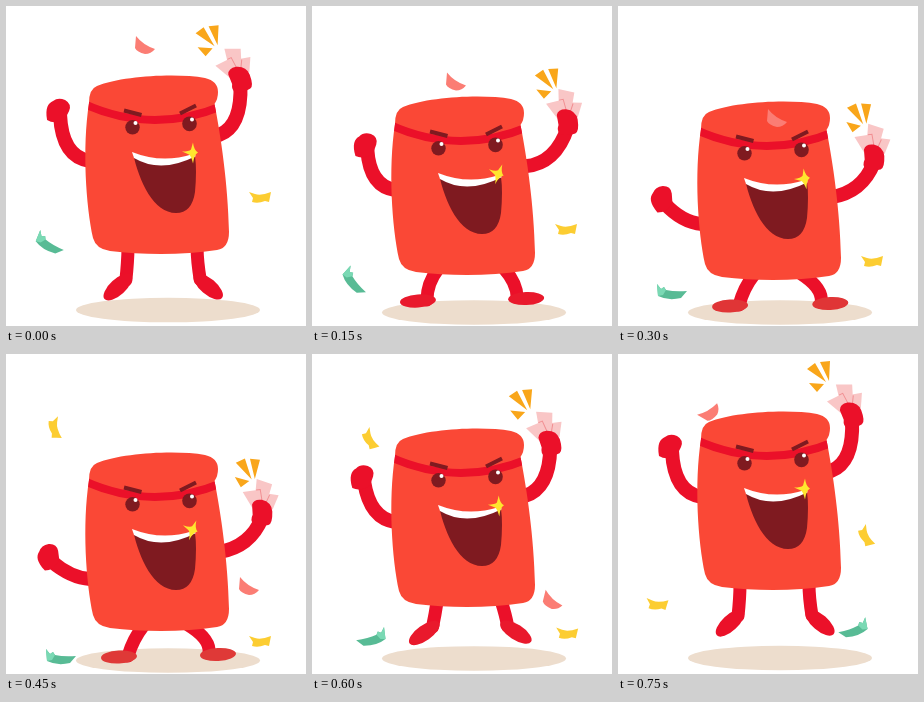
An HTML page for the animation above (900 ms loop, 300 by 320 pixels).

```html
<!DOCTYPE html>
<html lang="en">
<head>
<meta charset="utf-8">
<title>Jumping red envelope</title>
<style>
html, body { margin: 0; width: 100%; height: 100%; overflow: hidden; background: #fff; }
svg { display: block; width: 300px; height: 320px; }
</style>
</head>
<body>
<svg id="stage" viewBox="0 0 300 320"></svg>
<script>
const RED = '#eb1029', BODY = '#fa4836', DARK = '#7f1a20';
const STEP = 150;
const DIPS = [0, 21, 26, 29, 5, -12];    // how far the body sinks in each pose
const SWINGS = [0, .2, .9, 1, .2, 0];    // how far the arms have dropped

const smooth = (a, b, v) => {
  const p = Math.min(1, Math.max(0, (v - a) / (b - a)));
  return p * p * (3 - 2 * p);
};
const mix = (a, b, p) => a + (b - a) * p;

const shape = (d, fill) => `<path d="${d}" fill="${fill}"/>`;
const line = (d, color, width, cap = 'butt') =>
  `<path d="${d}" fill="none" stroke="${color}" stroke-width="${width}" stroke-linecap="${cap}"/>`;
const dot = (x, y, rx, ry, fill) => `<ellipse cx="${x}" cy="${y}" rx="${rx}" ry="${ry}" fill="${fill}"/>`;
const place = (x, y, turn, content, flip = 1) =>
  `<g transform="translate(${x} ${y}) rotate(${turn}) scale(${flip} 1)">${content}</g>`;
const limb = (start, bend, end, width) => line(`M${start}Q${bend} ${end}`, RED, width, 'round');

const bodyPath = 'M83 97Q83 83 91 80C116 70 170 67 199 72Q212 75 212 86Q212 93 208.5 98' +
  'C215 131 222 178 223 226Q223 242 211 244C178 249 138 249 104 245Q90 243 87 232C80 200 76 142 83 97Z';
const envelope = `<clipPath id="body"><path d="${bodyPath}"/></clipPath>` +
  shape(bodyPath, BODY) +
  `<g clip-path="url(#body)">${line('M78 98Q146 129 216 100', RED, 8)}</g>` +
  line('M118 104.5L135.5 109M174 107.5L190 99.5', DARK, 4) +
  dot(126.5, 121.3, 7.2, 7.3, DARK) + dot(129.5, 117, 2, 2.1, '#fff') +
  dot(183.5, 117.8, 7.3, 7.4, DARK) + dot(186, 113.5, 2, 2.1, '#fff') +
  shape('M127 147Q155 158 189 150Q191 164 189 186Q186 207 170 207C148 207 133 176 127 147Z', DARK) +
  shape('M126 146Q156 158 187 148L190 150Q155 168 128 152Z', '#fff');

const star = shape('M1-10Q2-2 6 0Q2 2 1 11Q-1 3-3 2L-10-1Q-3-1-1-3Z', '#ffe62e');
const fist = shape('M-11 9C-13-3-10-8-5-10Q0-14 7-11Q14-7 11 0L7 8Q-3 14-11 9Z', RED);
const cardFist =
  shape('M-10-33L6-30L3-9L-9-12Z', '#f9c6c6') +
  shape('M-22-18L-8-22L0-6L-9-2Z', '#f9c6c6') +
  shape('M4-20L14-20L10-5L1-8Z', '#f9c6c6') +
  line('M-9-22L-5-23L-1-10M5-19L2-9', '#f18f92', 1) +
  shape('M-11-7Q-10-13-2-13Q8-12 10-3Q12 9 8 11Q0 14-7 12Q-11 9-9 3Z', RED);
const rays = shape('M-9-23L1-24L0-4ZM-22-16L-14-22L-3-3ZM-20-2L-5-1L-12 7Z', '#f9a61a');

const pink = shape('M-9-10Q-2-1 10 3Q6 8 0 8Q-8 6-10 2Z', '#fb7d74');
const yellow = shape('M-11-5L-5-3Q1-1 11-5L10 0L9 5L5 4Q-2 7-8 5L-7 1Z', '#fccd32');
const green = shape('M-15-8L-11-3L-8-5L-6-2Q3 0 15-1L9 6Q-4 9-14 4Z', '#58bb95') +
  shape('M-15-8L-11-3L-8-5L-6-2L-9 3L-14 4Z', '#7ad9b4');

// Each scrap drifts from [x, y, turn] to another between its first and last pose.
const scraps = [
  { art: pink, first: 0, last: 2, from: [139, 40, 0], to: [159, 113, 0] },
  { art: pink, first: 3, last: 4, from: [243, 233, 0], to: [241, 247, 9] },
  { art: pink, first: 5, from: [92, 57, -64] },
  { art: yellow, first: 0, last: 3, from: [254, 191, 0], to: [254, 287, 0] },
  { art: yellow, first: 3, last: 4, from: [49, 74, 80], to: [58, 85, 63] },
  { art: yellow, first: 4, from: [255, 279, 2] },
  { art: yellow, first: 5, from: [248, 182, 65] },
  { art: yellow, first: 5, from: [39, 250, 6] },
  { art: green, first: 0, last: 1, from: [44, 238, 27], to: [43, 276, 47] },
  { art: green, first: 2, last: 3, from: [54, 286, 0], to: [55, 303, 0] },
  { art: green, first: 4, from: [59, 284, -12], flip: -1 },
  { art: green, first: 5, from: [235, 275, -16], flip: -1 }
];

function drawScrap({ art, first, last = first, from, to = from, flip }, pose) {
  if (pose < first || pose > last) return '';
  const p = (pose - first) / (last - first || 1);
  return place(mix(from[0], to[0], p * p), mix(from[1], to[1], p), mix(from[2], to[2], p), art, flip);
}

function drawLegs(dip, swing, ground) {
  const color = `rgb(${235 - 12 * swing} ${17 + 40 * swing} ${41 + 14 * swing})`;
  const footY = 281 + dip - 7 * smooth(0, 5, dip);
  const hipY = 242 + dip, kneeY = 256 + dip;
  const leg = (hipX, kneeX, footX, footY, side, tilt) =>
    limb([hipX, hipY], [kneeX, kneeY], [footX + side * (8 + ground), footY - 7 + 6 * ground], 13) +
    place(footX, footY, tilt, dot(0, 0, 18, mix(8, 6.5, ground), color));
  return leg(122 + ground + 15 * swing, 122 - 10 * ground + 15 * swing,
      112 - 8 * ground + 9 * swing, footY, 1, mix(-43, -3, ground)) +
    leg(191 + 4 * ground - 13 * swing, 191 + 14 * ground,
      202 + 13 * ground - 3 * swing, footY - 2 * ground - .5, -1, mix(41, -3, ground));
}

function drawArms(dip, swing, ground) {
  const leftX = 52 + 4 * ground - 13 * swing, leftY = 105 + dip + 69 * swing;
  const rightX = 234 + 22 * ground, rightY = 73 + dip + 14 * ground + 43 * swing;
  return limb([84, 155 + dip + 41 * swing], [56 + 9 * swing, 151 + dip + 44 * swing], [leftX + 2, leftY + 4], 14) +
    limb([213, 129 + dip + 3 * ground + 37 * swing],
      [236 + 8 * ground, 120 + dip + 10 * ground + 34 * swing], [rightX, rightY + 5], 14) +
    place(leftX, leftY, -34 * swing, fist) +
    place(rightX, rightY, -11 + 11 * ground + 8 * swing, cardFist) +
    place(rightX - 23 + 11 * ground + 4 * swing, rightY - 30, 12 * swing, rays);
}

function draw(pose) {
  const dip = DIPS[pose], swing = SWINGS[pose];
  const ground = smooth(-2, 23, dip);
  const twinkle = ground * (6 - 14 * Math.cos(Math.PI * pose));
  return dot(162, 304 + 2.5 * ground, 92, 12.3, '#edddcd') +
    drawLegs(dip, swing, ground) +
    drawArms(dip, swing, ground) +
    place(0, dip, 0, envelope + place(186, 146.5, twinkle, star)) +
    scraps.map(scrap => drawScrap(scrap, pose)).join('');
}

const stage = document.getElementById('stage');
let shown = -1;
function tick() {
  const pose = Math.floor(performance.now() / STEP) % DIPS.length;
  if (pose !== shown) stage.innerHTML = draw(shown = pose);
  requestAnimationFrame(tick);
}
tick();
</script>
</body>
</html>
```
